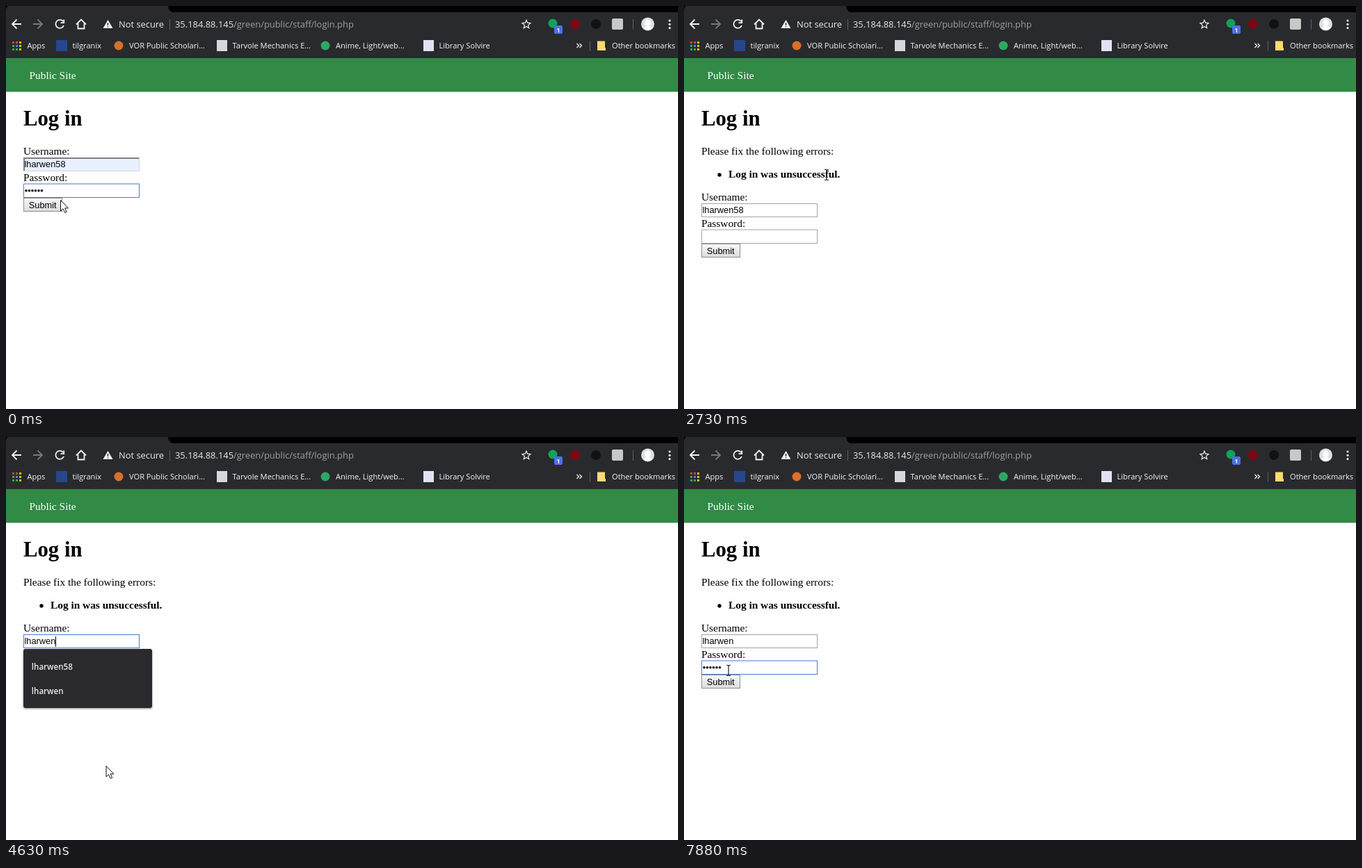
Animation of 966 by 580 pixels, one loop 8 s. Source, as an HTML page:

```html
<!DOCTYPE html>
<html lang="en">
<head>
<meta charset="utf-8">
<title>Log in</title>
<style>
  html, body { margin: 0; width: 100%; height: 100%; overflow: hidden; background: #fefefe; }
  svg { display: block; }
  text { white-space: pre; }
  .serif { font: 15.36px "Liberation Serif", "Times New Roman", serif; }
  .sans { font: 12.8px "Liberation Sans", Arial, sans-serif; }
  .ui { font: 12.9px "Open Sans", "Noto Sans", sans-serif; fill: #e8eaed; }
  .mark { font-size: 11.1px; fill: #f4f4f5; }
  .option { font-size: 11.6px; font-weight: 600; }
  .bold { font-weight: bold; }
  .line { fill: none; stroke: #f1f3f4; stroke-width: 1.8; }
</style>
</head>
<body>
<svg width="966" height="580" viewBox="0 0 966 580">
  <defs>
    <linearGradient id="face" x2="0" y2="1">
      <stop stop-color="#f8f8f8"/><stop offset="1" stop-color="#dcdcdc"/>
    </linearGradient>
    <filter id="shadow" x="-10%" y="-10%" width="120%" height="130%">
      <feDropShadow dx="0" dy="1" stdDeviation="1.5" flood-opacity=".45"/>
    </filter>
  </defs>
  <rect width="966" height="580" fill="#fefefe"/>

  <!-- browser toolbar -->
  <rect width="966" height="75" fill="#292a2d"/>
  <path d="M233 0H966V9H241Q234 9 233 0ZM0 0H3Q1 1 0 5Z" fill="#000"/>
  <g class="line">
    <path d="M22 26H9.5M15.5 19.5 9 26 15.5 32.5"/>
    <path d="M39 26H51.5M45.5 19.5 52 26 45.5 32.5" stroke="#77787b"/>
    <path id="reload" d="M82 22A6 6 0 1 0 83 28M83.2 19.5V24.2H78.5"/>
    <path id="stop" d="M72 21 82 31M82 21 72 31"/>
    <path d="M101 26.5 108 19.5 115 26.5M103.5 25V32.5H112.5V25"/>
    <path d="M748 20.2 749.7 24.2 754 24.6 750.7 27.4 751.7 31.7 748 29.4 744.3 31.7 745.3 27.4 742 24.6 746.3 24.2Z" stroke-width="1.2"/>
    <path d="M235.5 19V34M901.5 19V34M839.5 50V65" stroke="#5d5e61" stroke-width="1"/>
    <path d="M820.5 54 823.5 57 820.5 60M824.5 54 827.5 57 824.5 60" stroke-width="1.3"/>
  </g>
  <path d="M146.5 20 153.5 32H139.5Z" fill="#f1f3f4"/>
  <path d="M146.5 24V28M146.5 29.2V30.6" stroke="#292a2d" stroke-width="1.4"/>
  <text class="ui" x="162" y="31">Not secure</text>
  <text class="ui" x="243" y="31">35.184.88.145<tspan fill="#9aa0a6">/green/public/staff/login.php</tspan></text>
  <circle cx="786" cy="25" r="6.5" fill="#12a05c"/>
  <rect x="788" y="28" width="12" height="12" rx="2" fill="#4d6ff0"/>
  <text class="ui bold" x="791.2" y="37.6" font-size="10" style="font-size:9.5px">1</text>
  <circle cx="818" cy="26" r="7" fill="#800610"/>
  <circle cx="848" cy="26" r="7" fill="#111214"/>
  <rect x="871" y="18" width="16" height="16" rx="2" fill="#c8c8c8"/>
  <circle cx="922.5" cy="26" r="9.5" fill="#dedfe0"/>
  <path d="M916.5 32Q918 29.5 921 29A4.3 5 0 1 1 924 29Q927 29.5 928.5 32Q922.5 37 916.5 32Z" fill="#fff"/>
  <g fill="#f1f3f4"><circle cx="954" cy="21" r="1.6"/><circle cx="954" cy="26.3" r="1.6"/><circle cx="954" cy="31.6" r="1.6"/></g>

  <!-- bookmarks -->
  <g id="apps"></g>
  <rect x="72" y="49" width="16" height="16" fill="#26478d"/>
  <circle cx="162" cy="57" r="6.5" fill="#d9702b"/>
  <rect x="303" y="49" width="15" height="16" fill="#d5d7dc"/>
  <circle cx="459" cy="57" r="6.5" fill="#2da862"/>
  <rect x="600" y="49" width="15" height="16" fill="#dfe3f3"/>
  <path d="M850 50.5H861V60H862V64H850Z" fill="#fbd975"/>
  <g id="marks"></g>

  <!-- page -->
  <rect y="75" width="966" height="48.5" fill="#318a46"/>
  <g class="serif">
    <text x="33.5" y="105" fill="#fff">Public Site</text>
    <text class="bold" x="25" y="172" style="font-size:30.72px">Log in</text>
    <g id="errors">
      <text x="25" y="214">Please fix the following errors:</text>
      <circle cx="51" cy="243" r="2.7"/>
      <text class="bold" x="64" y="247">Log in was unsuccessful.</text>
    </g>
  </g>
  <g id="form">
    <text class="serif" x="25" y="280">Username:</text>
    <rect id="userBox" x="25.5" y="284.5" width="166" height="19"/>
    <path id="inset" d="M26 303V285H191" fill="none" stroke="#7d7f87" stroke-width="2"/>
    <text id="user" class="sans" x="26.5" y="298"></text>
    <path id="squiggle" fill="none" stroke="#e33" stroke-width="1"/>
    <text class="serif" x="25" y="318">Password:</text>
    <rect id="passBox" x="25.5" y="322" width="166" height="19.5"/>
    <g id="dots"></g>
    <rect id="button" x="25.5" y="342.5" width="55" height="19" fill="url(#face)" stroke="#8f8f8f"/>
    <text class="sans" x="32.8" y="356.5">Submit</text>
    <path id="caret" stroke="#000" stroke-width="1"/>
  </g>
  <g id="menu">
    <rect x="25" y="305" width="185" height="85" rx="3" fill="#292a2d" filter="url(#shadow)"/>
    <rect id="hover" x="25" y="313" width="185" height="35" fill="#4d4d4f"/>
    <text id="option0" class="ui option" x="36.8" y="334.7"></text>
    <text id="option1" class="ui option" x="36.8" y="369.7"></text>
  </g>
  <path id="arrow" d="M.5.5V16L4 12.8 6.7 18.5 9.2 17.4 6.6 11.9H11.5Z" fill="#fff" stroke="#111"/>
  <path id="beam" d="M-3-7.5H-1L0-6.5 1-7.5H3M0-6.5V6.5M-3 7.5H-1L0 6.5 1 7.5H3" fill="none" stroke="#222" stroke-width="1.2"/>
</svg>
<script>
const LOOP = 8000;
const LONG = "lharwen58", SHORT = "lharwen";
const el = id => document.getElementById(id);
const show = (id, on) => el(id).setAttribute("visibility", on ? "inherit" : "hidden");
const set = (id, attrs) => Object.entries(attrs).forEach(([k, v]) => el(id).setAttribute(k, v));

const appColors = ["#ea4335", "#ea4335", "#fbbc05", "#34a853", "#4285f4", "#fbbc05", "#34a853", "#34a853", "#fbbc05"];
el("apps").innerHTML = appColors.map((c, i) =>
  `<rect x="${9 + i % 3 * 5}" y="${51 + Math.floor(i / 3) * 5}" width="3" height="3" fill="${c}"/>`).join("");

const bookmarks = {
  "Apps": 30.5, "tilgranix": 95.5, "VOR Public Scholari...": 177, "Tarvole Mechanics E...": 325.5,
  "Anime, Light/web...": 474, "Library Solvire": 622.5, "Other bookmarks": 871
};
el("marks").innerHTML = Object.entries(bookmarks).map(([label, x]) =>
  `<text class="ui mark" x="${x}" y="61">${label}</text>`).join("");

el("option0").textContent = LONG;
el("option1").textContent = SHORT;
const dotX = i => 29 + 4.48 * i;
el("dots").innerHTML = Array.from({ length: 6 }, (_, i) =>
  `<circle cx="${dotX(i)}" cy="331.7" r="1.75"/>`).join("");

let wave = "M26.5 300.5";
for (let x = 26.5; x < 86; x += 4) wave += "q1-2 2 0t2 0";
el("squiggle").setAttribute("d", wave);

// [start, pointer x, pointer y, changes to the state]
const steps = [
  [0, 78, 279, { pointer: "arrow", user: LONG, filled: true, focus: "pass", dots: 6 }],
  [120, 78, 279, { focus: "", pressed: true }],
  [270, 78, 279, { pressed: false, loading: true }],
  [570, 78, 279, { errors: true, filled: false, dots: 0 }],
  [710, 95, 276, { loading: false }],
  [860, 130, 274],
  [1010, 165, 273],
  [1150, 189, 273],
  [1270, 170, 268],
  [1400, 140, 261],
  [1530, 112, 254, { pointer: "beam" }],
  [1660, 92, 250],
  [1970, 92, 244],
  [2280, 62, 245],
  [2430, 39, 247],
  [2580, 120, 245],
  [2730, 205, 243],
  [2880, 272, 255, { pointer: "arrow" }],
  [3030, 200, 285],
  [3180, 113, 298, { pointer: "beam" }],
  [3330, 113, 298, { focus: "user", caret: true }],
  [3480, 113, 298, { squiggle: true }],
  [3910, 113, 298, { caret: false }],
  [4060, 113, 298, { menu: true, squiggle: false }],
  [4210, 108, 336, { pointer: "arrow", hover: true, filled: true }],
  [4360, 125, 400, { hover: false, filled: false, caret: true }],
  [4510, 140, 455, { user: LONG.slice(0, -1) }],
  [4630, 143.5, 473, { user: SHORT }],
  [4780, 130, 458],
  [4900, 108, 438, { menu: false, focus: "", caret: false }],
  [5020, 88, 397],
  [5140, 73, 362],
  [5290, 62.5, 320.5, { pointer: "beam" }],
  [5850, 63.5, 325],
  [5970, 63.5, 325, { focus: "pass", caret: true }],
  [6470, 63.5, 325, { caret: false }],
  [7020, 63.5, 325, { dots: 2, caret: true }],
  [7140, 63.5, 325, { dots: 4 }],
  [7290, 63.5, 325, { dots: 6 }],
  [7880, 64, 336, { caret: false }]
];

function stateAt(time) {
  const state = {};
  for (const [start, x, y, changes] of steps) {
    if (start > time) break;
    Object.assign(state, { x, y }, changes);
  }
  return state;
}

function draw(time) {
  const s = stateAt(time);
  const border = name => s.focus === name ? "#4d78d2" : "#a3a3a3";
  show("reload", !s.loading);
  show("stop", s.loading);
  show("errors", s.errors);
  set("form", { transform: `translate(0 ${s.errors ? 0 : -66})` });

  set("userBox", { fill: s.filled ? "#e8f0fe" : "#fff", stroke: s.filled && !s.focus.startsWith("user") ? "#d5d5d5" : border("user") });
  set("inset", { stroke: s.focus === "user" ? "#7f98cf" : "#7d7f87" });
  show("inset", s.filled);
  el("user").textContent = s.user;
  show("squiggle", s.squiggle);
  set("passBox", { fill: "#fff", stroke: border("pass") });
  [...el("dots").children].forEach((dot, i) => dot.setAttribute("visibility", i < s.dots ? "inherit" : "hidden"));
  set("button", { fill: s.pressed ? "#d8d8d8" : "url(#face)" });

  const inUser = s.focus === "user";
  const caretX = inUser ? Math.round(26.5 + el("user").getComputedTextLength()) + .5 : Math.floor(dotX(s.dots) - 1.7) + .5;
  set("caret", { d: `M${caretX} ${inUser ? 287 : 324}v15` });
  show("caret", s.caret);

  show("menu", s.menu);
  show("hover", s.menu && s.hover);
  for (const name of ["arrow", "beam"]) {
    show(name, s.pointer === name);
    set(name, { transform: `translate(${s.x} ${s.y})` });
  }
}

function tick() {
  draw(performance.now() % LOOP);
  requestAnimationFrame(tick);
}
tick();
</script>
</body>
</html>
```
